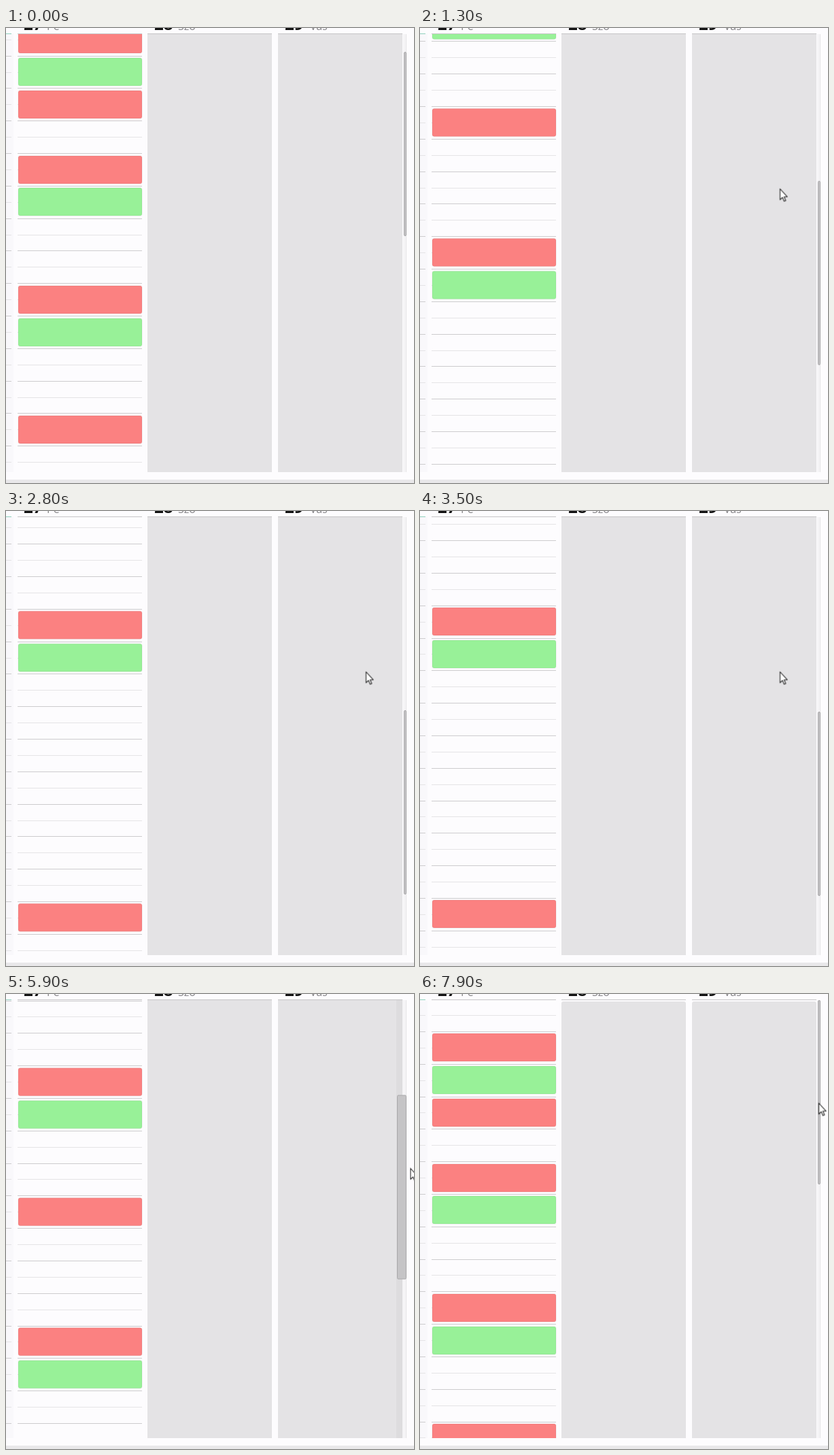
An HTML page that plays this animation: 600x669 px, repeating every 8000 ms.

```html
<!DOCTYPE html>
<html lang="hu">
<head>
<meta charset="utf-8">
<title>Calendar scroll</title>
<style>
@property --s { syntax: "<number>"; inherits: true; initial-value: 62; }
@property --w { syntax: "<number>"; inherits: true; initial-value: 4; }
html, body { margin: 0; width: 100%; height: 100%; overflow: hidden; background: #fdfcfe; }
#stage {
  position: absolute; left: 0; top: 0; width: 600px; height: 669px; overflow: hidden;
  background: #fdfcfe;
  animation: scroll 8s infinite, widen 8s linear infinite;
}
#stage div, svg { position: absolute; }
#view { left: 0; top: 8px; width: 600px; height: 645px; overflow: hidden; }
#content { left: 0; top: 0; width: 600px; height: 1540px; transform: translateY(calc(var(--s) * -1px)); }
.hours { left: 0; top: 1.5px; width: 11px; height: 1540px; background: #f9f8fb; }
.lines {
  top: 23px; height: 1518px;
  background: repeating-linear-gradient(#e5e4e6 0 1px, transparent 1px 23.9px, #cdccce 23.9px 24.9px, transparent 24.9px 47.8px);
}
.off { top: 3px; width: 183px; height: 1540px; border-radius: 3px; background: #e4e3e5; }
.slot {
  left: 17.5px; width: 182.5px; height: 41px; border-radius: 3px;
  box-shadow: inset 0 0 0 1px rgba(0, 0, 0, .03), 0 0 2px rgba(0, 0, 0, .12);
}
.free { background: #98f198; }
.busy { background: #fb8181; }
.rule { top: 8px; height: 1px; background: #c6c5c7; }
#track {
  top: 9px; right: 11px; height: 644px; width: calc(var(--w) * 1px + 1px); box-sizing: border-box;
  background: rgba(0, 0, 0, .03); border-right: 1px solid #e6e5e7;
}
#thumb {
  top: 9px; right: 11px; height: 271px; width: calc(var(--w) * 1px); box-sizing: border-box;
  border: 1px solid #a9a8aa; border-radius: 2px; background: #c5c4c6;
  transform: translateY(calc(max(0, var(--s)) * .42px));
}
#foot { left: 0; top: 664px; width: 600px; height: 5px; background: #e9e8ea; }
#cursor { left: 0; top: 0; animation: point 8s infinite; }
.day { font: 700 24px "Open Sans", sans-serif; fill: #111; }
.name { font: 400 16px "Open Sans", sans-serif; fill: #858487; }

@keyframes scroll {
  0% { --s: 62; animation-timing-function: cubic-bezier(.45, 0, .45, 1); }
  16.25% { --s: 513.5; animation-timing-function: cubic-bezier(.4, 0, .4, 1); }
  27.5% { --s: 114.5; animation-timing-function: cubic-bezier(.4, 0, .4, 1); }
  33.75% { --s: 674; animation-timing-function: ease-out; }
  41.25%, 43.75% { --s: 681; animation-timing-function: cubic-bezier(.4, 0, .4, 1); }
  58.75% { --s: 57; animation-timing-function: ease-in-out; }
  68.75% { --s: 560; animation-timing-function: ease-in-out; }
  80% { --s: 0; animation-timing-function: ease-out; }
  83.75% { --s: -108.5; animation-timing-function: cubic-bezier(.3, 0, .2, 1); }
  95%, 100% { --s: 0; }
}
@keyframes widen {
  0%, 57.25% { --w: 4; }
  58.75% { --w: 11; }
  59.5%, 91.25% { --w: 14; }
  95%, 96.25% { --w: 6; }
  98.75%, 100% { --w: 4; }
}
@keyframes point {
  0%, 4.99% { transform: translate(528.5px, 235.5px); opacity: 0; }
  5%, 47.5% { transform: translate(528.5px, 235.5px); opacity: 1; animation-timing-function: ease-in-out; }
  57.5%, 58.75% { transform: translate(590px, 140px); animation-timing-function: ease-in-out; }
  68.75% { transform: translate(593px, 351px); animation-timing-function: ease-in-out; }
  80% { transform: translate(595px, 116px); }
  82%, 86% { transform: translate(606px, 124px); }
  93.75%, 100% { transform: translate(585.5px, 159.5px); opacity: 1; }
}
</style>
</head>
<body>
<div id="stage">
  <svg width="600" height="8">
    <text class="day" x="26" y="2.6">27</text><text class="name" x="60" y="3">Pé</text>
    <text class="day" x="218" y="2.6">28</text><text class="name" x="253" y="3">Szo</text>
    <text class="day" x="410" y="2.6">29</text><text class="name" x="447" y="3">Vas</text>
  </svg>
  <div id="view">
    <div id="content">
      <div class="hours"></div>
      <div class="lines" style="left:0;width:8px"></div>
      <div class="lines" style="left:17px;width:183px"></div>
      <div class="off" style="left:208px"></div>
      <div class="off" style="left:400px"></div>
    </div>
  </div>
  <div class="rule" style="left:0;width:8px;background:#8fd0bd"></div>
  <div class="rule" style="left:17px;width:183px"></div>
  <div class="rule" style="left:208px;width:183px"></div>
  <div class="rule" style="left:400px;width:183px"></div>
  <div id="track"></div>
  <div id="thumb"></div>
  <div id="foot"></div>
  <svg id="cursor" width="14" height="22">
    <path d="M1 1V17L4.6 13.6 7 19.2 9.4 18.2 7 12.7H11.6Z" fill="#fff" stroke="#222" stroke-width="1.1" stroke-linejoin="round"/>
  </svg>
</div>
<script>
const HOUR = 47.8, FIRST = 50.4;
const content = document.getElementById('content');

function addSlots(kind, hours) {
  for (const h of hours) {
    const slot = document.createElement('div');
    slot.className = 'slot ' + kind;
    slot.style.top = FIRST + h * HOUR + 'px';
    content.append(slot);
  }
}
addSlots('busy', [0, 2, 4, 8, 12, 16, 25]);
addSlots('free', [1, 5, 9, 17]);
</script>
</body>
</html>
```
